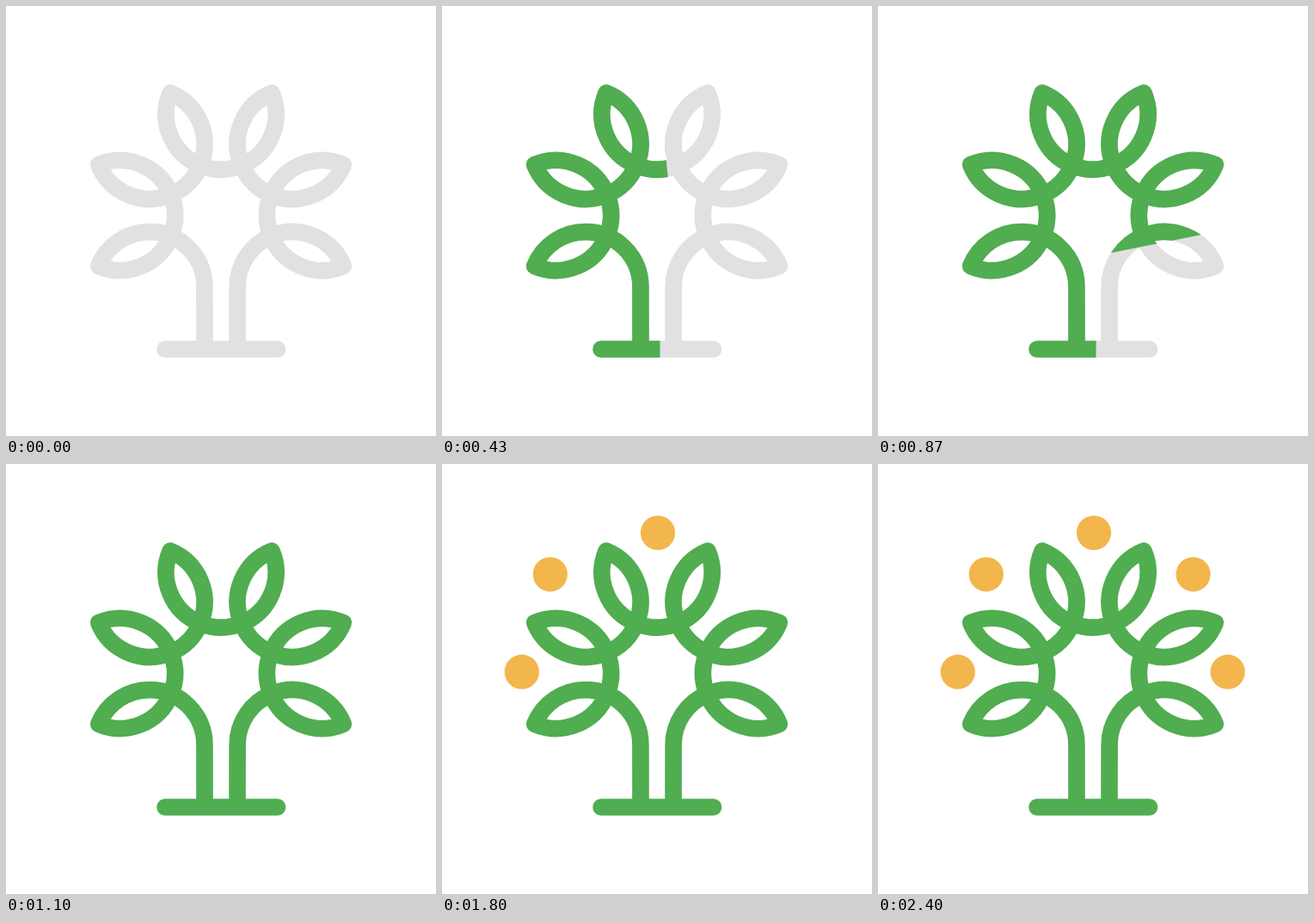
These frames come from a looping animation (500x500 px, 2600 ms). An HTML page with a canvas:

```html
<!DOCTYPE html>
<html lang="en">
<head>
<meta charset="utf-8">
<title>Growing tree</title>
<style>
  html, body { margin: 0; width: 100%; height: 100%; overflow: hidden; background: #fff; }
  canvas { display: block; }
</style>
</head>
<body>
<canvas id="stage" width="500" height="500"></canvas>
<script>
const ctx = document.getElementById('stage').getContext('2d');
const GREY = '#e1e1e1', GREEN = '#50ad50', ORANGE = '#f2b64c';
const LOOP = 2600, FPS = 30, FULL = 33;
const rad = deg => deg * Math.PI / 180;

// Fruits: centre and the frame in which each one pops up
const fruits = [
  [92.8, 241.7, 38], [125.8, 128.3, 44], [251, 80, 53],
  [366.5, 128.3, 64], [406.6, 241.7, 71]
];

// Edge of the green sweep: frame, pivot x, pivot y, degrees clockwise from straight down
const sweep = [
  [0, 254, 330, 0], [5, 250, 241, 93], [13, 266, 230, 174],
  [16, 258, 238, 218], [26, 254, 290.6, 258.6], [32, 254, 425, 248]
];

// The crown is a chain of equal circles whose centres lie on an octagon
function makeTree() {
  const cx = 250, cy = 243.5, ring = 117.5, r = 64;
  const across = ring * Math.sin(rad(22.5));
  const tip = rad(22.5) + Math.asin(across / r);
  const path = new Path2D();
  path.moveTo(231, 399);
  for (let i = 0; i < 7; i++) {
    const a = rad(135 + 45 * i);
    path.arc(cx + ring * Math.cos(a), cy + ring * Math.sin(a), r,
      i === 0 ? 0 : a - tip, i === 6 ? Math.PI : a + tip, true);
  }
  path.lineTo(269, 399);
  path.moveTo(185, 399);
  path.lineTo(315.5, 399);
  return path;
}
const tree = makeTree();

function drawTree(color) {
  ctx.strokeStyle = color;
  ctx.stroke(tree);
}

function clipToSweep(frame) {
  const i = sweep.findIndex(key => key[0] >= frame);
  const from = sweep[i - 1], to = sweep[i];
  const p = (frame - from[0]) / (to[0] - from[0]);
  const [, x, y, angle] = from.map((v, j) => v + (to[j] - v) * p);
  ctx.beginPath();
  ctx.moveTo(x, y);
  ctx.lineTo(254, Math.max(y, 300));
  ctx.lineTo(253, 500);
  ctx.arc(x, y, 900, rad(90), rad(90 + angle));
  ctx.closePath();
  ctx.clip();
}

function drawFruit([x, y, start], frame) {
  if (frame < start) return;
  const budding = frame === start;
  ctx.globalAlpha = budding ? 0.5 : 1;
  ctx.fillStyle = ORANGE;
  ctx.beginPath();
  if (budding) ctx.roundRect(x - 15.5, y - 11.5, 31, 28, 6);
  else ctx.arc(x, y, 20.1, 0, 2 * Math.PI);
  ctx.fill();
  ctx.globalAlpha = 1;
}

function draw(frame) {
  ctx.fillStyle = '#fff';
  ctx.fillRect(0, 0, 500, 500);
  ctx.lineWidth = 19.6;
  ctx.lineCap = ctx.lineJoin = 'round';
  if (frame < FULL) drawTree(GREY);
  if (frame > 0) {
    ctx.save();
    if (frame < FULL) clipToSweep(frame);
    drawTree(GREEN);
    ctx.restore();
  }
  fruits.forEach(fruit => drawFruit(fruit, frame));
}

let begin;
function tick(now) {
  begin ??= now;
  const time = (now - begin) % LOOP;
  // The motion advances in steps of 1/30 s; 4 ms absorbs timer rounding
  draw(Math.floor((time + 4) * FPS / 1000) % (LOOP * FPS / 1000));
  requestAnimationFrame(tick);
}
draw(0);
requestAnimationFrame(tick);
</script>
</body>
</html>
```
